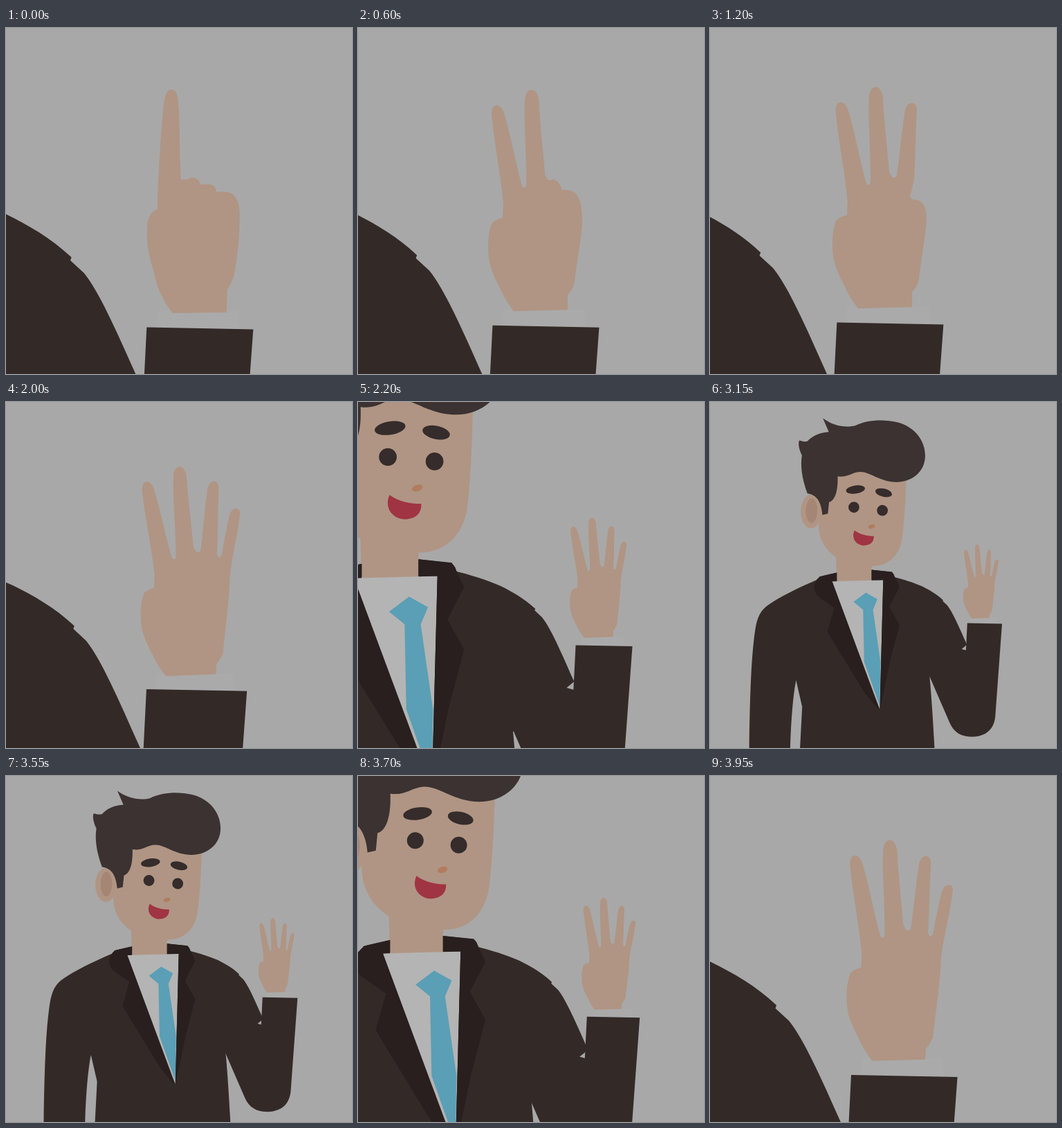
Animation of 500x500 px, one loop 4000 ms. Source, as an HTML page:

```html
<!DOCTYPE html>
<html lang="en">
<head>
<meta charset="utf-8">
<title>Counting hand</title>
<style>
  html, body { margin: 0; width: 100%; height: 100%; overflow: hidden; background: #a8a8a8; }
  svg { display: block; width: 100vw; height: 100vh; }
  .skin { fill: #b09584; }
  .suit { fill: #332a28; }
  .lapel { fill: #281f1e; }
  .shirt { fill: #b4b4b4; }
  .tie { fill: #5a9fb5; }
  .hair { fill: #3b3231; }
  .eye { fill: #352c2b; }
</style>
</head>
<body>
<svg viewBox="0 0 500 500">
  <g id="camera">
    <path fill="#aaaaaa" d="M373 312 H412 L413 326 H372Z"/>
    <path class="suit" d="M368 320 L419 321 L409 458 C407 474 398 486 376 487 C358 487 348 480 342 466 L312 397 L330 350 L366 360Z"/>

    <g id="body">
      <path class="lapel" d="M150 252 L176 246 L227 242 L257 245 L262 256 L262 300 L160 300Z"/>
      <path class="suit" d="M146 257 C120 268 92 282 76 293 C64 301 59 311 56 330 C50 370 48 430 47 520 L107 520
        C108 470 111 430 116 404 L125 443 L121 520 V620 H325 C321 530 317 450 312 397 L367 352
        C355 325 346 304 338 294 L331.500 288 L332 286.500 C322 277 311 271 301 266 C287 260 274 256 258 252 L230 290Z"/>
      <path class="skin" d="M174 195 H227 V268 H176Z"/>
      <path class="shirt" d="M169 259 L244 257 L239 447Z"/>
      <path class="tie" d="M200.500 289 L218.500 275.500 L235.500 285 L229 300.500 L240 377 L239 442 L216 377 L214.500 300.500Z"/>
      <path class="lapel" d="M169 259 L239 449 L217 423 L162 333 L172 298 L147 280 Q142 273 143 264 Q146 253 154 251 L176 246 V258Z"/>
      <path class="lapel" d="M244 257 L227 257 V242 L254 245 Q259 245 261 252 L268 267 L253 296 L268 323 L254 376 L239 449Z"/>

      <g id="head">
        <path class="skin" d="M150 100 L200 85 L240 98 L276 104 Q275 160 271 195 C267 222 250 236 227 236 C195 238 148 222 148 175Z"/>
        <ellipse class="skin" cx="137" cy="157" rx="15.500" ry="25"/>
        <ellipse cx="137.500" cy="156" rx="8.500" ry="18" fill="#a58674"/>
        <path class="hair" d="M152 20 C167 31 186 34 200 30 C217 21 242 20 260 24 C288 30 303 52 303 73
          C303 98 282 112 261 112 C236 112 222 97 207 98 C195 99 190 107 175 105 C176 128 171 141 163 143
          L161.500 160 L153.500 162 C151 138 141 132 131 131 C122 108 120 90 122 75 C117 65 116 56 118 53
          C124 55 127 55 130 54 C138 45 149 41 161 40Z"/>
        <ellipse class="eye" cx="201.500" cy="124" rx="14" ry="6" transform="rotate(-9 201.500 124)"/>
        <ellipse class="eye" cx="243" cy="128" rx="12.500" ry="6" transform="rotate(12 243 128)"/>
        <circle class="eye" cx="199.500" cy="150" r="8"/>
        <circle class="eye" cx="241.500" cy="154" r="8"/>
        <ellipse cx="226" cy="178" rx="5" ry="2.900" fill="#b07d5e" transform="rotate(-18 226 178)"/>
        <path fill="#a03443" d="M201 184 C209 190 219 192 229.500 192 C230 202 223 206 214 206 C203 205 196 195 201 184Z"/>
      </g>
    </g>

    <g id="hand"><path id="fingers" class="skin"/></g>
  </g>
</svg>
<script>
  const LOOP = 4000, STEP = 50;
  const NEAR = 3.02, FAR = 0.984, PIVOT = [447, 264];
  const byId = id => document.getElementById(id);
  const camera = byId('camera'), body = byId('body'), head = byId('head');
  const hand = byId('hand'), fingers = byId('fingers');

  // Hand outlines: shared palm and fingers, then a closing side for each count
  const palm = 'M234 412 C224 398 219 390 215 380 C200 352 197 338 197 320 C197 305 199 292 203 284 Q209 279 218 277 L219 258';
  const index = 'C216 220 206 170 202 130 C200 112 213 109 219 123 C228 150 236 195 246 231 Q249 236 252 231';
  const middle = 'C253 190 248 140 250 105 C252 88 267 87 270 106 C272 145 277 185 279 214 Q284 228 290 221';
  const ring = 'C295 185 298 150 302 126 C306 110 320 113 319 126 C317 165 317 200 315 227';
  const pinky = 'Q318 235 322 228 C326 205 331 185 334 170 C338 153 352 154 351 165 C347 198 337 235 334 262 C333 295 327 335 322 378 Q318 388 312 394 L311 410Z';
  const fist = 'C333 300 326 335 322 370 Q319 383 312 388 L312 410Z';
  const poses = [
    'M241 412 L233 401 C224 386 218 374 214 352 C206 330 202 305 205 280 Q208 265 219 262 C220 215 224 150 228 112 '
      + 'Q230 89 239 89 Q248 88 249 106 C252 145 251 185 253 219 L262 219 Q271 212 279 221 L281 226 L296 226 '
      + 'Q304 228 304 237 C328 233 338 244 338 270 C338 300 335 330 330 356 Q327 368 320 378 L319 411Z',
    palm + index + middle + 'Q300 223 304 237 C326 234 333 250 333 282' + fist,
    palm + index + middle + ring + 'L309 250 Q311 255 318 255 Q333 258 333 282' + fist,
    palm + index + middle + ring + pinky
  ];

  const swayX = [[0, -1.7], [1200, -8.3], [2000, -6.7], [2400, 0], [3150, 2.6], [3700, 1.4], [3950, -1.7], [4000, -1.7]];
  const swayY = [[0, -0.2], [1200, -2.5], [2000, -3], [2400, 0], [3150, 0.4], [3700, 0], [4000, -0.2]];
  const bodyX = [[0, 0], [1200, -0.5], [2000, -0.6], [2400, 0], [3150, 0.5], [3700, 2.1], [4000, 0]];
  const bodyY = [[0, 0], [1200, 0], [2000, 1.4], [2400, 0], [4000, 0]];
  const headTilt = [[0, 0], [2400, 0], [3150, 0.9], [3700, 0.5], [4000, 0]];
  const handTilt = [[0, 0], [1200, 0], [2000, -0.8], [2400, -0.8], [3700, 0], [4000, 0]];

  // Smooth curve through the keys, at rest at both ends
  function curve(keys, t) {
    const last = keys.length - 1;
    let i = 0;
    while (i < last - 1 && t >= keys[i + 1][0]) i++;
    const slope = k => k === 0 || k === last ? 0
      : (keys[k + 1][1] - keys[k - 1][1]) / (keys[k + 1][0] - keys[k - 1][0]);
    const [t0, a] = keys[i], [t1, b] = keys[i + 1];
    const d = t1 - t0, u = (t - t0) / d, v = 1 - u;
    return a * v * v * (1 + 2 * u) + b * u * u * (3 - 2 * u)
      + d * u * v * (v * slope(i) - u * slope(i + 1));
  }

  function ease(t, start, length) {
    const p = Math.min(1, Math.max(0, (t - start) / length));
    return p < 0.5 ? 4 * p ** 3 : 1 - 4 * (1 - p) ** 3;
  }

  function draw(t) {
    const wide = ease(t, 1815, 669) - ease(t, 3501, 500);
    const zoom = NEAR + (FAR - NEAR) * wide;
    const x = PIVOT[0] * (1 - zoom) + zoom * curve(swayX, t);
    const y = PIVOT[1] * (1 - zoom) + zoom * curve(swayY, t);
    camera.setAttribute('transform', `translate(${x} ${y}) scale(${zoom})`);
    body.setAttribute('transform', `translate(${curve(bodyX, t)} ${curve(bodyY, t)})`);
    head.setAttribute('transform', `rotate(${curve(headTilt, t)} 200 240)`);
    hand.setAttribute('transform', `translate(${391 - 3.2 * wide} 312.9) rotate(${curve(handTilt, t)})`
      + ` scale(${(1 + 0.025 * wide) / NEAR}) translate(-273 -411)`);
    fingers.setAttribute('d', poses[Math.min(3, Math.floor(t / 500))]);
  }

  const start = performance.now();
  function tick() {
    const t = (performance.now() - start) % LOOP;
    draw(Math.floor(t / STEP) * STEP);
    requestAnimationFrame(tick);
  }
  tick();
</script>
</body>
</html>
```
